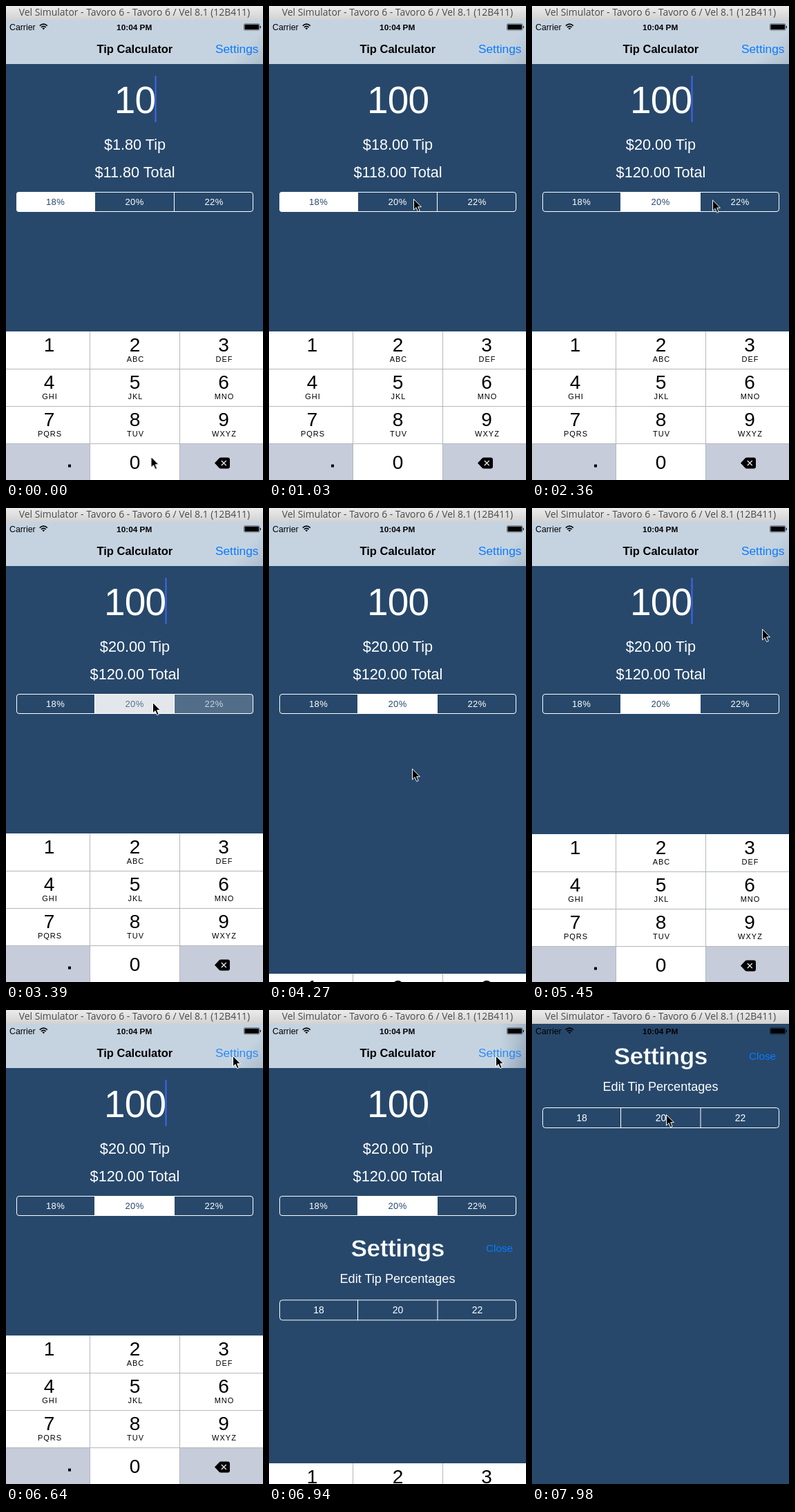
Write an HTML page that moves like this. It is 372x686 px and loops after 8 s.

```html
<!DOCTYPE html>
<html lang="en">
<head>
<meta charset="utf-8">
<title>Tip Calculator</title>
<style>
  :root { --k: 0; --navy: #27486b; --link: #0a7aff; }
  html, body { margin: 0; width: 100%; height: 100%; overflow: hidden; background: var(--navy); }
  svg { display: block; width: 372px; height: 686px; overflow: hidden; }
  text { font-family: "Liberation Sans", Arial, sans-serif; text-anchor: middle; fill: #fff; }
  .start { text-anchor: start; }
  .dark { fill: #000; }
  .link { fill: var(--link); }
  .line { fill: none; stroke: #fff; }
  .bill { font-size: 55px; letter-spacing: -.8px; }
  .heading { font-size: 35.4px; font-weight: bold; letter-spacing: -.5px; stroke: var(--navy); stroke-width: .5px; }
  .sum { font-size: 21.7px; }
  .seg { font-size: 13px; letter-spacing: .4px; }
  .digit { font-size: 28px; }
  .abc { font-size: 11px; letter-spacing: 1px; }

  /* 1% of every timeline is one tick; the script only sets --k */
  .anim { animation: 100s linear infinite paused; animation-delay: calc(var(--k) * -1s - 1ms); }
  .hard { animation-timing-function: step-end; }

  #pointer { animation-name: pointer; }
  @keyframes pointer {
    0%, 2% { transform: translate(209.5px, 652px); }
    3% { transform: translate(209px, 610px); }
    5% { transform: translate(206px, 400px); }
    7% { transform: translate(209px, 279px); }
    8%, 14% { transform: translate(211px, 280px); }
    15% { transform: translate(226px, 281px); }
    17%, 19% { transform: translate(296px, 280px); }
    22%, 24% { transform: translate(212px, 281px); }
    26%, 28% { transform: translate(208px, 375px); }
    29% { transform: translate(207px, 377px); }
    30% { transform: translate(206px, 383px); }
    31% { transform: translate(190px, 446px); }
    32%, 33% { transform: translate(166px, 496px); }
    34% { transform: translate(184px, 320px); }
    35% { transform: translate(206px, 142px); }
    36% { transform: translate(254px, 152px); }
    37% { transform: translate(333px, 175px); }
    38% { transform: translate(336px, 120px); }
    39% { transform: translate(331px, 76px); }
    41%, 48% { transform: translate(328px, 66px); }
    50% { transform: translate(270px, 82px); }
    52% { transform: translate(190px, 121px); }
    54%, 100% { transform: translate(194px, 151px); }
  }

  #keyboard { animation-name: keyboard; }
  @keyframes keyboard {
    0%, 27% { transform: none; }
    28% { transform: translateY(134px); }
    29% { transform: translateY(203px); }
    30%, 35% { transform: translateY(216px); }
    36% { transform: translateY(40px); }
    37% { transform: translateY(1px); }
    38%, 45% { transform: none; }
    46% { transform: translateY(100px); }
    47% { transform: translateY(185px); }
    48% { transform: translateY(208px); }
    49%, 100% { transform: translateY(216px); }
  }

  #sheet { animation-name: sheet; }
  @keyframes sheet {
    0%, 46% { transform: translateY(668px); }
    47% { transform: translateY(278.5px); }
    48% { transform: translateY(108px); }
    49% { transform: translateY(40px); }
    50% { transform: translateY(13px); }
    51% { transform: translateY(4px); }
    52%, 100% { transform: none; }
  }

  #caret { animation-name: caret; }
  @keyframes caret {
    0%, 9%, 16%, 22%, 36%, 42% { opacity: 1; }
    6%, 13%, 19%, 26%, 39% { opacity: 0; }
    46% { opacity: .5; }
    47% { opacity: .1; }
    48%, 100% { opacity: 0; }
  }

  #zero { animation-name: press; }
  @keyframes press {
    0%, 2%, 100% { fill: #fff; }
    1% { fill: #c6ccda; }
  }

  #open { animation-name: dim; }
  @keyframes dim {
    0%, 44% { opacity: 1; }
    45%, 100% { opacity: .82; }
  }

  #shade { animation-name: shade; }
  @keyframes shade {
    0%, 45% { opacity: 0; }
    47%, 100% { opacity: 1; }
  }

  #fill0 { animation-name: fill0; }
  #fill1 { animation-name: fill1; }
  #fill2 { animation-name: fill2; }
  @keyframes fill0 { 0%, 9% { opacity: 1; } 11%, 100% { opacity: 0; } }
  @keyframes fill1 {
    0%, 9%, 19%, 22% { opacity: 0; }
    11%, 17%, 24%, 100% { opacity: 1; }
    23% { opacity: .87; }
  }
  @keyframes fill2 {
    0%, 17%, 24%, 100% { opacity: 0; }
    19%, 22% { opacity: 1; }
    23% { opacity: .2; }
  }
  #label0 { animation-name: label0; }
  #label1 { animation-name: label1; }
  #label2 { animation-name: label2; }
  @keyframes label0 { 0%, 9% { fill: #27486b; } 11%, 100% { fill: #fff; } }
  @keyframes label1 {
    0%, 9%, 19%, 22% { fill: #fff; }
    11%, 17%, 24%, 100% { fill: #27486b; }
    23% { fill: #58708c; }
  }
  @keyframes label2 {
    0%, 17%, 24%, 100% { fill: #fff; }
    19%, 22% { fill: #27486b; }
    23% { fill: #ccd3db; }
  }
</style>
</head>
<body>
<svg viewBox="0 0 372 686">
  <defs>
    <linearGradient id="chrome" x2="0" y2="1">
      <stop stop-color="#ececec"/><stop offset="1" stop-color="#d2d2d2"/>
    </linearGradient>
    <linearGradient id="corner" gradientUnits="userSpaceOnUse" x1="346" y1="58" x2="372" y2="84">
      <stop stop-color="#27486b" stop-opacity="0"/><stop offset="1" stop-color="#27486b" stop-opacity=".16"/>
    </linearGradient>
    <linearGradient id="edge">
      <stop stop-color="#27486b" stop-opacity="0"/><stop offset="1" stop-color="#27486b" stop-opacity=".2"/>
    </linearGradient>
    <clipPath id="round"><rect x="15" y="269" width="343" height="29" rx="4"/></clipPath>
  </defs>

  <rect width="372" height="686" fill="#27486b"/>
  <rect y="20" width="372" height="64" fill="#c5d3e0"/>
  <rect x="320" y="20" width="52" height="64" fill="url(#corner)"/>
  <rect id="shade" class="anim" x="334" y="20" width="38" height="64" fill="url(#edge)"/>
  <text x="186.3" y="68" class="dark" font-size="16.5" font-weight="bold">Tip Calculator</text>
  <text x="334.2" y="68" id="open" class="link anim hard" font-size="17.3">Settings</text>

  <text id="bill" class="bill" x="186.6" y="154.5">10</text>
  <rect id="caret" class="anim hard" y="101" width="2" height="67" fill="#4067ec"/>
  <text id="tip" class="sum" x="186.5" y="208"></text>
  <text id="total" class="sum" x="186.5" y="248"></text>
  <g id="rates" clip-path="url(#round)"></g>
  <path class="line" d="M128.5 269V298M243.5 269V298"/>
  <rect class="line" x="15.5" y="269.5" width="342" height="28" rx="3.5"/>

  <g id="sheet" class="anim">
    <rect y="20" width="372" height="668" fill="#27486b"/>
    <text x="186.2" y="79" class="heading">Settings</text>
    <text x="333.5" y="72" class="link" font-size="15.3">Close</text>
    <text x="186" y="117" font-size="18.1">Edit Tip Percentages</text>
    <rect class="line" x="15.5" y="141.5" width="342" height="29" rx="4"/>
    <path class="line" d="M128.5 141V171M244 141V171"/>
    <g id="edits" font-size="14"></g>
  </g>

  <text x="5" y="35" class="start dark" font-size="12.3">Carrier</text>
  <g fill="none" stroke="#000" stroke-width="1.7">
    <path d="M48.8 28.6Q54.3 23.8 59.8 28.6M50.9 30.8Q54.3 27.9 57.7 30.8"/>
    <path d="M54.3 34.3L52.4 32.2Q54.3 30.8 56.2 32.2Z" fill="#000" stroke="none"/>
  </g>
  <text x="185.7" y="35" class="dark" font-size="11.8" font-weight="bold">10:04 PM</text>
  <rect x="344.5" y="25.8" width="22.4" height="9.2" rx="1.5" fill="none" stroke="#000" stroke-width=".5"/>
  <rect x="345.5" y="26.8" width="20.4" height="7.2" rx=".8"/>
  <rect x="367.6" y="28.8" width="1.2" height="3.4" rx=".6"/>

  <g id="keyboard" class="anim">
    <rect y="471" width="372" height="217" fill="#fff"/>
    <path d="M0 633H122V688H0ZM251 633H372V688H251Z" fill="#c6ccda"/>
    <rect id="zero" class="anim hard" x="122" y="633" width="129" height="55" fill="#fff"/>
    <path d="M0 525.5H372M0 579.5H372M0 633.5H372M121.5 471V688M251.5 471V688" fill="none" stroke="#b4b7bd"/>
    <g id="keys"></g>
    <rect x="90" y="663.5" width="4" height="4"/>
    <path d="M302 661.5L308.5 654.6Q309.6 653.5 311 653.5H321Q324 653.5 324 656.5V666.5Q324 669.5 321 669.5H311Q309.6 669.5 308.5 668.4Z"/>
    <path d="M311.8 658L318.8 665M318.8 658L311.8 665" stroke="#dfe3ea" stroke-width="1.4"/>
  </g>

  <rect width="372" height="20" fill="url(#chrome)"/>
  <text x="186" y="14.3" style="font: 13.9px 'Open Sans', sans-serif; fill: #4a4a4a">Vel Simulator - Tavoro 6 - Tavoro 6 / Vel 8.1 (12B411)</text>

  <path id="pointer" class="anim" d="M.5 .5V16L4 12.6 6.6 18.6 9.2 17.5 6.7 11.7H11.4Z" stroke="#fff"/>
</svg>
<script>
  const LOOP = 8000, TICK = 147.6, LEAD = 12;
  const $ = id => document.getElementById(id);
  const label = (x, y, cls, s, id = '') => `<text x="${x}" y="${y}" class="${cls}" ${id && `id="${id}"`}>${s}</text>`;

  const percents = [18, 20, 22], middles = [71.5, 186, 301];
  $('rates').innerHTML = percents.map((p, i) =>
    `<rect id="fill${i}" class="anim" x="${[15, 128, 243][i]}" y="269" width="${[114, 116, 115][i]}" height="29" fill="#fff"/>` +
    label(middles[i], 288, 'seg anim', p + '%', 'label' + i)).join('');
  $('edits').innerHTML = percents.map((p, i) => label(middles[i] + .5, 161, '', p)).join('');

  const letters = ['', 'ABC', 'DEF', 'GHI', 'JKL', 'MNO', 'PQRS', 'TUV', 'WXYZ'];
  const columns = [62.5, 186.5, 315];
  $('keys').innerHTML = letters.map((abc, i) => {
    const x = columns[i % 3], y = 500.4 + 54 * Math.floor(i / 3);
    return label(x, y, 'dark digit', i + 1) + label(x + 1, y + 15, 'dark abc', abc);
  }).join('') + label(186.5, 670.4, 'dark digit', 0);

  const money = n => '$' + n.toFixed(2);
  let last = -1;

  function show(k) {
    const bill = k < 2 ? 10 : 100;
    const rate = k < 10 ? .18 : k >= 18 && k < 23 ? .22 : .2;
    const editing = k < 27 || k >= 35;
    $('bill').textContent = bill;
    $('tip').textContent = money(bill * rate) + ' Tip';
    $('total').textContent = money(bill * (1 + rate)) + ' Total';
    $('caret').setAttribute('x', bill < 100 ? 215.5 : 230.5);
    $('caret').style.visibility = editing ? 'visible' : 'hidden';
    document.documentElement.style.setProperty('--k', k);
  }

  function frame() {
    const k = Math.floor((performance.now() % LOOP + LEAD) / TICK);
    if (k !== last) show(last = k);
    requestAnimationFrame(frame);
  }
  frame();
</script>
</body>
</html>
```
